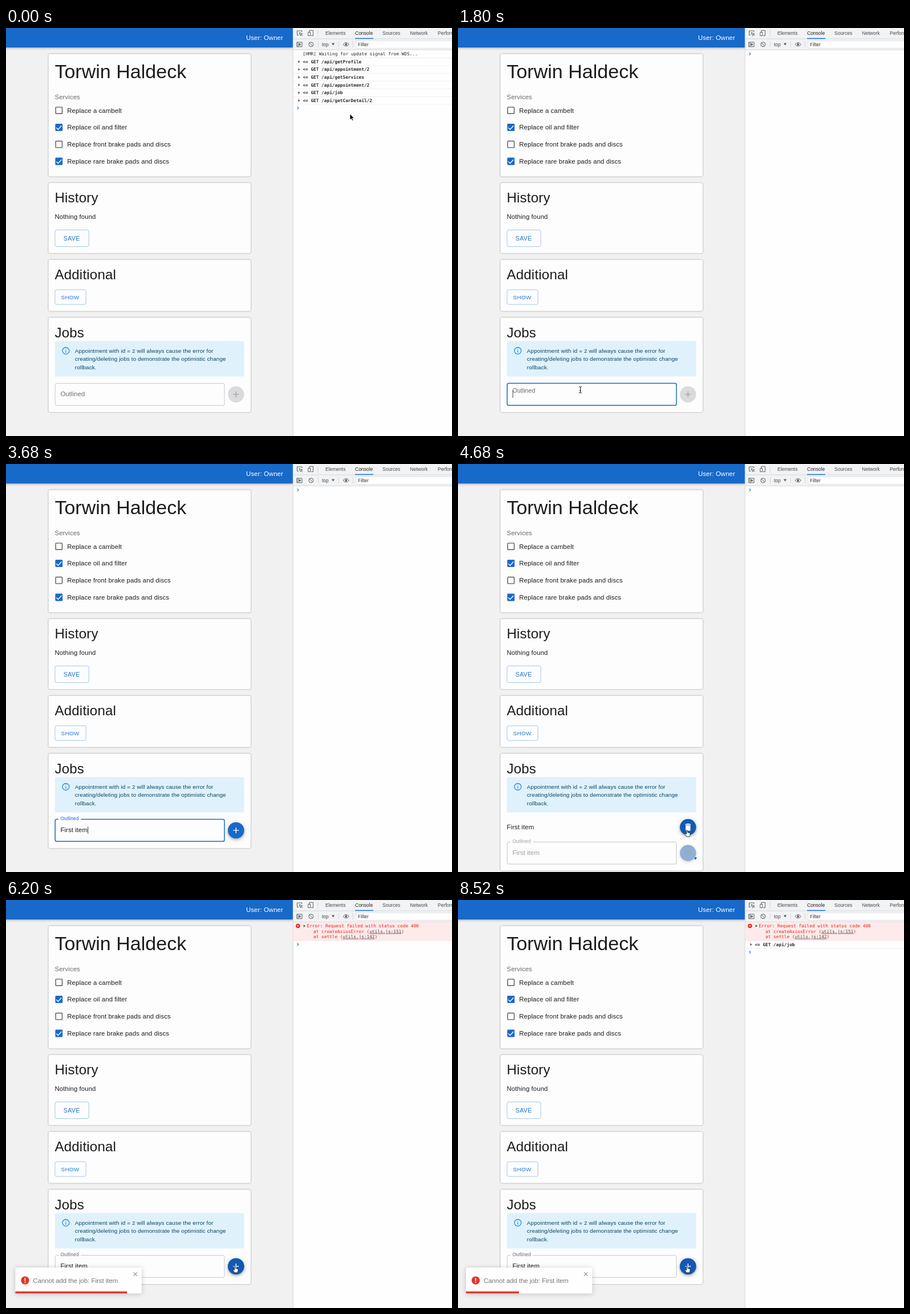
Recreate the animation shown at these times as an HTML page. Size 782 by 716 pixels, loop 8560 ms.

```html
<!DOCTYPE html>
<html lang="en">
<head>
<meta charset="utf-8">
<title>Optimistic job rollback</title>
<style>
  html, body { margin: 0; width: 100%; height: 100%; overflow: hidden; background: #f1f1f2; }
  svg { display: block; }
  text { font-family: "Liberation Sans", Arial, sans-serif; white-space: pre; fill: #1c1c1d; }
  .h3 { font-size: 34.06px; }
  .h4 { font-size: 24.14px; letter-spacing: .00735em; }
  .body { font-size: 11.35px; letter-spacing: .00938em; }
  .alert { font-size: 9.93px; letter-spacing: .01071em; fill: #0c4463; }
  .btn { letter-spacing: .0286em; fill: #1f74cc; }
  .tab { font-size: 8.5px; fill: #46484b; }
  .mono { font: 7.78px "DejaVu Sans Mono", monospace; fill: #2a2a2a; }
  .bold { font-weight: bold; }
  .err { fill: #e3231b; }
  .link { fill: #5a4a4c; text-decoration: underline; }
  .grey { fill: #69696b; }
  .card { fill: #fdfdfe; filter: drop-shadow(0 .9px .8px rgba(0,0,0,.34)) drop-shadow(0 .5px 1px rgba(0,0,0,.1)); }
  .outline { fill: none; stroke: #8db9e6; stroke-width: .8; }
  .fab { filter: drop-shadow(0 2px 2px rgba(0,0,0,.28)) drop-shadow(0 1px 4px rgba(0,0,0,.14)); }
  .bar { filter: drop-shadow(0 1.4px 2px rgba(0,0,0,.3)); }
  .toast { filter: drop-shadow(0 1px 4px rgba(0,0,0,.2)); }
  .icon { fill: none; stroke: #5b5e62; stroke-width: 1; }
  .sep { stroke: #cdcfd3; stroke-width: .8; }
  .row { stroke: #ececee; stroke-width: .8; }
</style>
</head>
<body>
<svg width="782" height="716" viewBox="0 0 782 716">
  <defs>
    <g id="off"><rect x="-5.7" y="-5.7" width="11.4" height="11.4" rx=".8" fill="none" stroke="#59595b" stroke-width="1.42"/></g>
    <g id="on">
      <rect x="-6.4" y="-6.4" width="12.8" height="12.8" rx="1.4" fill="#1769ca"/>
      <path d="M-4.5 .5L-1.4 3.5L4.5 -2.9" fill="none" stroke="#fff" stroke-width="1.42"/>
    </g>
    <path id="plus" d="M-5 -.71H-.71V-5H.71V-.71H5V.71H.71V5H-.71V.71H-5Z"/>
    <path id="tri" d="M-1.5 -2.3L1.9 0L-1.5 2.3Z" fill="#56585b"/>
  </defs>

  <rect width="503" height="716" fill="#f1f1f2"/>
  <rect class="bar" x="-5" y="-5" width="508" height="39.2" fill="#1769ca"/>
  <text class="body" x="485.9" y="21.4" text-anchor="end" style="fill:#fff">User: Owner</text>

  <rect class="card" x="74.5" y="45.4" width="354.5" height="215" rx="2.8"/>
  <text class="h3" x="85.4" y="88.4">Torwin Haldeck</text>
  <text class="body grey" x="85.5" y="125.1">Services</text>
  <use href="#off" x="92.8" y="144.6"/><text class="body" x="107.3" y="148.6">Replace a cambelt</text>
  <use href="#on" x="92.8" y="174.4"/><text class="body" x="107.3" y="178.4">Replace oil and filter</text>
  <use href="#off" x="92.8" y="204.2"/><text class="body" x="107.3" y="208.2">Replace front brake pads and discs</text>
  <use href="#on" x="92.8" y="234"/><text class="body" x="107.3" y="238">Replace rare brake pads and discs</text>

  <rect class="card" x="74.5" y="271.9" width="354.5" height="123.2" rx="2.8"/>
  <text class="h4" x="85.4" y="306.4">History</text>
  <text class="body" x="85.5" y="335.1">Nothing found</text>
  <rect class="outline" x="86" y="354.3" width="59.2" height="29.3" rx="2.8"/>
  <text class="btn" x="100.8" y="372.7" font-size="10.64">SAVE</text>

  <rect class="card" x="74.5" y="406.8" width="354.5" height="89.9" rx="2.8"/>
  <text class="h4" x="85.4" y="441.3">Additional</text>
  <rect class="outline" x="86" y="459.3" width="54.2" height="25.8" rx="2.8"/>
  <text class="btn" x="96.6" y="475.6" font-size="9.94">SHOW</text>

  <rect id="jobs" class="card" x="74.5" y="508.3" width="354.5" height="165.6" rx="2.8"/>
  <text class="h4" x="85.4" y="542.6">Jobs</text>
  <rect x="85.6" y="549.2" width="332" height="62.3" rx="2.8" fill="#dff2fc"/>
  <g fill="none" stroke="#2490e2" stroke-width="1.3">
    <circle cx="104.9" cy="566.4" r="5.9"/><path d="M104.9 565.6V569.7M104.9 563V564.3"/>
  </g>
  <text class="alert" x="120.8" y="570">Appointment with id = 2 will always cause the error for</text>
  <text class="alert" x="120.8" y="584.3">creating/deleting jobs to demonstrate the optimistic change</text>
  <text class="alert" x="120.8" y="598.5">rollback.</text>

  <g id="item">
    <text class="body" x="85.5" y="640.9">First item</text>
    <circle class="fab" cx="403.3" cy="637.3" r="14.2" fill="#1259b3"/>
    <path transform="translate(394.8 628.8) scale(.71)" fill="#fff" d="M6 19c0 1.1.9 2 2 2h8c1.1 0 2-.9 2-2V7H6zM19 4h-3.5l-1-1h-5l-1 1H5v2h14z"/>
  </g>

  <g id="form">
    <rect id="frame" x="86.2" y="623.6" width="296.8" height="38.7" rx="2.8" fill="none"/>
    <rect id="notch" x="92" y="621.8" height="4" fill="#fdfdfe"/>
    <text id="label" class="body">Outlined</text>
    <text id="value" class="body" x="95.4" y="646.1"></text>
    <rect id="caret" y="636" width=".8" height="13" fill="#1c1c1d"/>
    <circle cx="403.3" cy="642.9" r="14.2" fill="#dbdbdd"/>
    <g id="add">
      <circle class="fab" cx="403.3" cy="642.9" r="14.2" fill="#1769ca"/>
      <circle id="hover" cx="403.3" cy="642.9" r="14.2" fill="#1259b3"/>
    </g>
    <use id="cross" href="#plus" x="403.3" y="642.9"/>
    <circle id="spin" cx="403.3" cy="642.9" r="16.1" fill="none" stroke="#1769ca" stroke-width="2.9" pathLength="126.92"/>
  </g>

  <rect x="503" width="279" height="716" fill="#fefefe"/>
  <rect x="503" width="279" height="38.3" fill="#f2f3f4"/>
  <path class="sep" d="M503.3 0V716M503 19H782M503 38.3H782M547 3.5V15M547.5 23V34M583.2 23V34M608.5 23V34"/>
  <rect x="614" y="22.5" width="180" height="13" fill="#fff" stroke="#d9dade" stroke-width=".7"/>
  <path d="M612 18.4H644" stroke="#1a73e8" stroke-width="1.5"/>
  <text class="tab" x="560" y="12.2">Elements</text>
  <text class="tab" x="612" y="12.2" style="fill:#222">Console</text>
  <text class="tab" x="660" y="12.2">Sources</text>
  <text class="tab" x="708.3" y="12.2">Network</text>
  <text class="tab" x="757" y="12.2">Performance</text>
  <text class="tab" x="554" y="31.7">top</text>
  <text class="tab" x="617" y="31.9" style="fill:#333">Filter</text>
  <path d="M571 26.6H576.2L573.6 30.8Z" fill="#5b5e62"/>
  <g class="icon">
    <path d="M513 12.5H510.5V5H519V7"/><path d="M514 8L520 10.4L517.4 11.2L516.4 13.6ZM517.2 11L520 14"/>
    <path d="M531.8 7V4.3H538.5V13.6H535M529.8 7.5H533.8V13.6H529.8Z"/>
    <path d="M509.8 25H519V32.8H509.8ZM512 25V32.8"/><path d="M514 27L517 28.9L514 30.8Z" fill="#5b5e62"/>
    <circle cx="534.9" cy="28.8" r="4"/><path d="M532.1 26L537.7 31.6"/>
    <path d="M591 28.7Q596.2 22.3 601.4 28.7Q596.2 35.1 591 28.7Z"/><circle cx="596.2" cy="28.7" r="1.5" fill="#5b5e62"/>
  </g>
  <g id="log"><text class="mono" x="520.6" y="48.2">[HMR] Waiting for update signal from WDS...</text><path class="row" d="M504 52.3H782"/></g>
  <g id="fail">
    <rect x="503.7" y="38.7" width="279" height="32.2" fill="#fdebeb"/>
    <path d="M504 71H782" stroke="#f8d3d3" stroke-width=".8"/>
    <circle cx="511.9" cy="45.4" r="3.7" fill="#e02a20"/>
    <path d="M510.5 44L513.3 46.8M513.3 44L510.5 46.8" stroke="#fff" stroke-width=".9"/>
    <use href="#tri" x="523.2" y="45.6"/>
    <text class="mono err" x="527.4" y="48.2">Error: Request failed with status code 400</text>
    <text class="mono err" x="539" y="57.6">at createAxiosError (<tspan class="link">utils.js:151</tspan>)</text>
    <text class="mono err" x="539" y="66.8">at settle (<tspan class="link">utils.js:142</tspan>)</text>
  </g>
  <g id="refetch"></g>
  <path id="prompt" d="M510.6 -2.3L513 0L510.6 2.3" fill="none" stroke="#3b7de8" stroke-width="1.2"/>

  <g id="toast" class="toast">
    <rect x="14" y="645" width="221.4" height="45.4" rx="2.8" fill="#fefefe"/>
    <circle cx="31" cy="667.6" r="7.2" fill="#e2362b"/>
    <path d="M31 663.3V668.4M31 670.1V671.9" stroke="#fff" stroke-width="1.7"/>
    <text class="body" x="45" y="671.6" style="fill:#757577;letter-spacing:0">Cannot add the job: First item</text>
    <path d="M221 653.4L227.4 659.8M227.4 653.4L221 659.8" stroke="#9a9a9c" stroke-width="1.3"/>
    <rect id="left" x="14" y="686.9" height="3.5" fill="#e2362b"/>
  </g>

  <g id="pointer">
    <path id="arrow" d="M0 0V10.2L2.4 8L4 11.6L5.8 10.8L4.2 7.3H7.4Z" fill="#000" stroke="#fff" stroke-width=".7"/>
    <path id="beam" d="M-2.3 -5.6Q0 -5.6 0 -4V4Q0 5.6 -2.3 5.6M2.3 -5.6Q0 -5.6 0 -4M0 4Q0 5.6 2.3 5.6M-1.2 1.5H1.2" fill="none" stroke="#111" stroke-width="1"/>
    <path id="hand" d="M-1 .4Q0 -.6 1 .4V4.2Q2 3.6 2.6 4.5Q3.6 3.9 4.2 4.9Q5.5 4.7 5.5 6V8.2L4.4 11.4H-.9L-3.5 7.2Q-4 5.6 -2.4 5.9L-1 7.2Z" fill="#fff" stroke="#111" stroke-width=".8"/>
  </g>
</svg>
<script>
const LOOP = 8560, BLUE = '#1769ca', WORD = 'First item';
const CLEAR = 800, FOCUS = 1783, SUBMIT = 4580, FAIL = 5610, REFETCH = 6400, SHIFT = 39.8;
const KEYS = [2920, 3030, 3110, 3220, 3300, 3380, 3440, 3510, 3580, 3640];
const LAST = KEYS[KEYS.length - 1];
const TRAIL = [[80, 603, 151], [640, 535, 27], [900, 535, 24], [1120, 250, 569], [1280, 250, 569],
  [1600, 214.5, 635], [3760, 214.5, 635], [4240, 401.5, 642.5]];

const el = {};
document.querySelectorAll('[id]').forEach(n => el[n.id] = n);
const set = (n, o) => { for (const k in o) n.setAttribute(k, o[k]); };
const show = (n, on) => n.style.display = on ? '' : 'none';
const clamp = v => Math.min(1, Math.max(0, v));
const lerp = (a, b, p) => a + (b - a) * p;

function bezier(x1, y1, x2, y2) {
  const at = (a, b, s) => 3 * (1 - s) * (1 - s) * s * a + 3 * (1 - s) * s * s * b + s * s * s;
  return x => {
    let lo = 0, hi = 1;
    for (let i = 0; i < 24; i++) {
      const m = (lo + hi) / 2;
      if (at(x1, x2, m) < x) lo = m; else hi = m;
    }
    return at(y1, y2, lo);
  };
}
const easeOut = bezier(0, 0, .2, 1), standard = bezier(.4, 0, .2, 1);
const inOut = bezier(.42, 0, .58, 1), bounce = bezier(.215, .61, .355, 1);

// Piecewise track of [time, value, ...] stops
function track(stops, t, ease) {
  if (t <= stops[0][0]) return stops[0].slice(1);
  for (let i = 1; i < stops.length; i++) {
    const a = stops[i - 1], b = stops[i];
    if (t < b[0]) {
      const p = ease((t - a[0]) / (b[0] - a[0]));
      return a.slice(1).map((v, k) => lerp(v, b[k + 1], p));
    }
  }
  return stops[stops.length - 1].slice(1);
}

function request(group, path, y) {
  group.insertAdjacentHTML('beforeend', `<use href="#tri" x="513.8" y="${y}"/>
    <text class="mono bold" x="520.4" y="${y + 2.6}">&lt;= GET /api/${path}</text>
    <path class="row" d="M504 ${y + 6.8}H782"/>`);
}
['getProfile', 'appointment/2', 'getServices', 'appointment/2', 'job', 'getCarDetail/2']
  .forEach((path, i) => request(el.log, path, 59.1 + 13.64 * i));
request(el.refetch, 'job', 78);

function drawField(t) {
  const focused = t >= FOCUS && t < SUBMIT, busy = t >= SUBMIT && t < FAIL;
  const hovered = t > 1540 && t < FOCUS;
  set(el.frame, {
    stroke: focused ? BLUE : hovered ? '#2b2b2c' : busy ? '#bdbdbf' : '#c1c1c3',
    'stroke-width': focused ? 1.5 : .9
  });
  const p = easeOut(clamp((t - FOCUS) / 200));
  set(el.label, { transform: `translate(95.4 ${lerp(646.1, 625.4, p)}) scale(${lerp(1, .75, p)})` });
  el.label.style.fill = busy ? '#a0a0a2' : focused && p > .6 ? BLUE : '#69696b';
  set(el.notch, { width: 39.3 * easeOut(clamp((t - FOCUS - 50) / 100)) });

  const n = KEYS.filter(k => t >= k).length;
  el.value.textContent = WORD.slice(0, n);
  el.value.style.fill = busy ? '#9d9d9f' : '';
  const since = t < KEYS[0] ? t - FOCUS : t < LAST ? 0 : t - LAST;
  show(el.caret, focused && Math.floor(since / 500) % 2 === 0);
  set(el.caret, { x: 95.7 + (n ? el.value.getComputedTextLength() : 0) });
}

function drawButton(t) {
  const fade = from => standard(clamp((t - from) / 250));
  const on = t < SUBMIT ? fade(KEYS[0]) : t < FAIL ? 1 - fade(SUBMIT) : fade(FAIL);
  const enabled = t >= KEYS[0] && t < SUBMIT || t >= FAIL;
  el.add.style.opacity = on;
  el.hover.style.opacity = t < FAIL ? (t < SUBMIT ? fade(4190) : 0) : 1;
  set(el.cross, { fill: enabled ? '#fff' : '#a3a3a5' });

  const busy = t >= SUBMIT && t < FAIL;
  show(el.spin, busy);
  if (!busy) return;
  const turn = (t - SUBMIT) / 1400 % 1, half = turn * 2;
  const grow = inOut(clamp(half)), chase = inOut(clamp(half - 1));
  set(el.spin, {
    transform: `rotate(${turn * 360} 403.3 642.9)`,
    'stroke-dasharray': `${lerp(1, 100, grow)} 200`,
    'stroke-dashoffset': -15 * grow - 110 * chase
  });
}

function drawToast(t) {
  const age = t - FAIL - 10;
  show(el.toast, age > 0);
  const [x] = track([[0, -3000], [420, 25], [525, -10], [630, 5], [700, 0]], age, bounce);
  set(el.toast, { transform: `translate(${x * .71} 0)` });
  set(el.left, { width: 221.4 * clamp(1 - age / 5000) });
}

function drawPointer(t) {
  const [x, y] = track(TRAIL, t, p => p * p * (3 - 2 * p));
  const hand = t > 3760 && x > 388, arrow = !hand && x > 429;
  set(el.pointer, { transform: `translate(${x} ${y})` });
  show(el.pointer, t < KEYS[0] || t > 3760);
  show(el.arrow, arrow);
  show(el.hand, hand);
  show(el.beam, !hand && !arrow);
}

function draw(t) {
  const pending = t >= SUBMIT && t < FAIL;
  show(el.item, pending);
  set(el.jobs, { height: 165.6 + (pending ? SHIFT : 0) });
  set(el.form, { transform: `translate(0 ${pending ? SHIFT : 0})` });
  show(el.log, t < CLEAR);
  show(el.fail, t >= FAIL);
  show(el.refetch, t >= REFETCH);
  const line = t < CLEAR ? 140.6 : t < FAIL ? 45.4 : t < REFETCH ? 78 : 91.6;
  set(el.prompt, { transform: `translate(0 ${line})` });
  drawField(t);
  drawButton(t);
  drawToast(t);
  drawPointer(t);
}

const start = performance.now();
function tick() {
  draw((performance.now() - start) % LOOP);
  requestAnimationFrame(tick);
}
tick();
</script>
</body>
</html>
```
